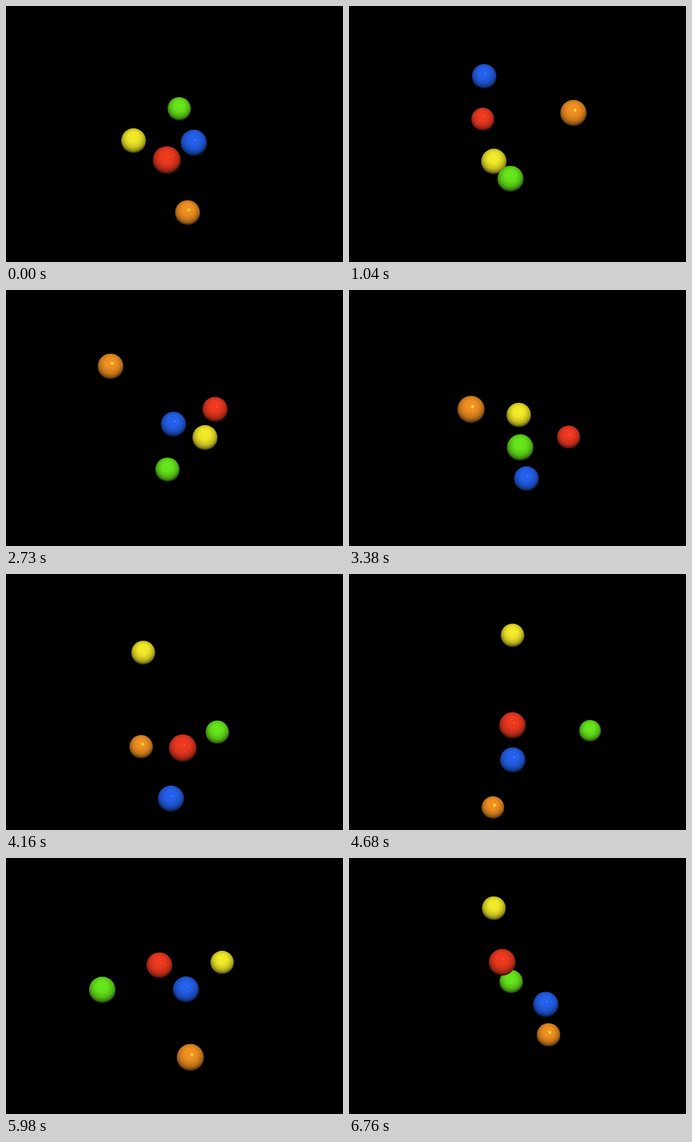
These frames come from a looping animation (487 px wide and 370 px high, 6890 ms). An HTML page with a canvas:

```html
<!DOCTYPE html>
<html lang="en">
<head>
<meta charset="utf-8">
<title>Five orbiting balls</title>
<style>
html, body { margin: 0; width: 100%; height: 100%; overflow: hidden; background: #000; }
canvas { display: block; }
</style>
</head>
<body>
<canvas id="stage" width="487" height="370"></canvas>
<script>
const ctx = document.getElementById("stage").getContext("2d");
const STEP = 130, STEPS = 53;
const poseSteps = [0, 8, 16, 26, 32, 40, 52];

// poses are [x, y] at poseSteps; turns are extra [step, x, y] where a ball swings round.
// Each ball nears and recedes as a wave, which sets its size and drawing order.
const balls = [
  {
    rgb: [103, 233, 27],
    size: { mean: 17.4, swing: 1.7, period: 20, peak: 6 },
    poses: [[250, 148], [233, 249], [233, 288], [247, 227], [305, 228], [209, 203], [234, 178]],
    turns: [[12, 230, 284], [36, 348, 226], [45, 137, 192]]
  },
  {
    rgb: [246, 237, 41],
    size: { mean: 17.6, swing: .8, period: 60, peak: 12 },
    poses: [[184, 194], [209, 224], [302, 228], [245, 180], [198, 113], [284, 131], [209, 72]],
    turns: [[36, 236, 88], [45, 318, 155]]
  },
  {
    rgb: [36, 98, 240], glint: "rgba(180,210,255,.7)", glintSize: .8,
    size: { mean: 18.3, swing: .6, period: 16, peak: 0 },
    poses: [[271, 197], [195, 101], [218, 122], [256, 272], [238, 324], [241, 198], [284, 211]],
    turns: []
  },
  {
    rgb: [242, 58, 32], glint: "rgba(255,175,145,.6)", glintSize: .8,
    size: { mean: 18.3, swing: 1.7, period: 16.5, peak: 16.5 },
    poses: [[232, 222], [193, 163], [258, 144], [317, 212], [255, 251], [227, 173], [221, 150]],
    turns: []
  },
  {
    rgb: [245, 147, 34], glint: "rgba(255,235,62,.9)", glintSize: 2,
    size: { mean: 18, swing: 1.7, period: 20, peak: 5 },
    poses: [[262, 298], [324, 154], [211, 78], [176, 172], [195, 249], [236, 324], [288, 255]],
    turns: [[12, 276, 86], [22, 148, 120], [37, 213, 346]]
  }
];

for (const ball of balls) {
  ball.path = ball.poses
    .map((pose, i) => [poseSteps[i], ...pose])
    .concat(ball.turns)
    .sort((a, b) => a[0] - b[0]);
}

function slope(points, i, axis) {
  const a = points[Math.max(i - 1, 0)];
  const b = points[i];
  const c = points[Math.min(i + 1, points.length - 1)];
  if (a === b || b === c) return (c[axis] - a[axis]) / (c[0] - a[0]);
  const before = b[0] - a[0], after = c[0] - b[0];
  return ((b[axis] - a[axis]) / before * after + (c[axis] - b[axis]) / after * before)
    / (before + after);
}

// Cubic Hermite curve through unevenly timed points.
function sample(points, t, axis) {
  let i = 0;
  while (i < points.length - 2 && t >= points[i + 1][0]) i++;
  const a = points[i], b = points[i + 1];
  const span = b[0] - a[0], u = (t - a[0]) / span, v = 1 - u;
  return v * v * ((1 + 2 * u) * a[axis] + u * span * slope(points, i, axis))
    + u * u * ((1 + 2 * v) * b[axis] - v * span * slope(points, i + 1, axis));
}

function radius({ mean, swing, period, peak }, t) {
  return mean + swing * Math.cos((t - peak) / period * Math.PI * 2);
}

function shade(rgb, level) {
  return `rgb(${rgb.map(c => Math.round(c * level)).join(",")})`;
}

function disc(x, y, r, fill) {
  ctx.fillStyle = fill;
  ctx.beginPath();
  ctx.arc(x, y, r, 0, Math.PI * 2);
  ctx.fill();
}

// Lit from above: the lower rim falls into shadow.
function drawBall({ x, y, r, ball }) {
  const light = ctx.createRadialGradient(x, y - r * .35, 0, x, y - r * .15, r * 1.15);
  light.addColorStop(0, shade(ball.rgb, 1));
  light.addColorStop(.4, shade(ball.rgb, .96));
  light.addColorStop(.7, shade(ball.rgb, .79));
  light.addColorStop(.88, shade(ball.rgb, .54));
  light.addColorStop(1, shade(ball.rgb, .15));
  disc(x, y, r, light);
  if (ball.glint) disc(x + r * .12, y - r * .22, ball.glintSize, ball.glint);
}

function render(now) {
  const t = Math.floor(now / STEP) % STEPS;
  ctx.fillStyle = "#000";
  ctx.fillRect(0, 0, 487, 370);
  balls
    .map(ball => ({
      ball,
      x: sample(ball.path, t, 1) + .3,
      y: sample(ball.path, t, 2) + .7,
      r: radius(ball.size, t)
    }))
    .sort((a, b) => a.r - b.r)
    .forEach(drawBall);
}

let start;
function tick(now) {
  start ??= now;
  render(now - start);
  requestAnimationFrame(tick);
}
render(0);
requestAnimationFrame(tick);
</script>
</body>
</html>
```
